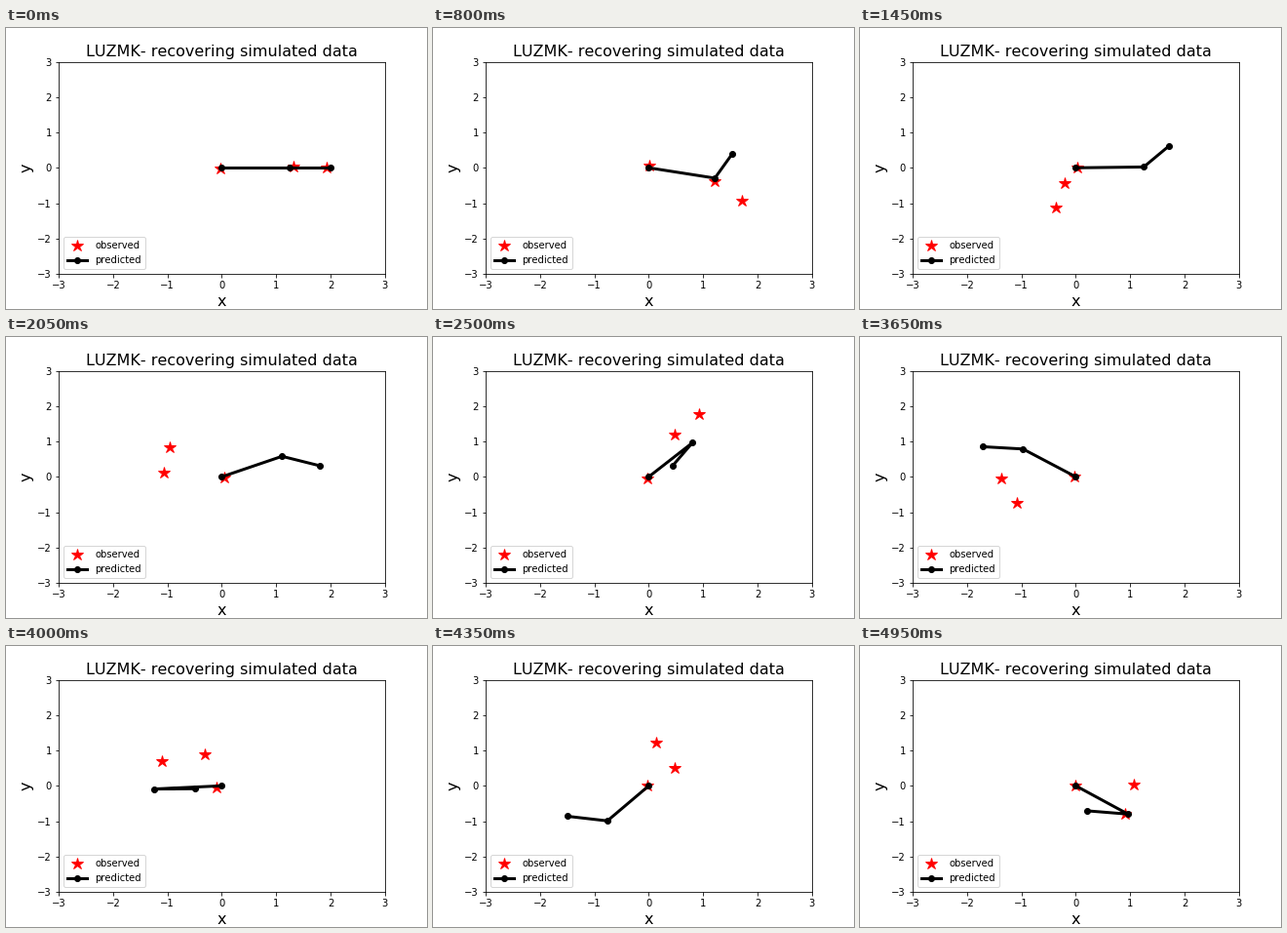
A matplotlib script that plays this animation: 432 px wide and 288 px high, repeating every 5 s.

```python
import numpy as np
import matplotlib.pyplot as plt
from matplotlib.animation import FuncAnimation

FRAMES, INTERVAL = 100, 50
UPPER, LOWER = 1.25, 0.75  # link lengths
KEY_TIMES = np.array([0, 16, 41, 59, 73, 87, 99])

plt.rcParams.update({
    "font.family": "DejaVu Sans",
    "text.kerning_factor": 6,  # whole-pixel letter spacing
})


def smooth(keys):
    """Cubic Hermite curve through key angles in degrees, one per frame."""
    t, v = KEY_TIMES, np.array(keys, float)
    slope = np.gradient(v, t, edge_order=2)
    n = np.arange(FRAMES)
    i = np.clip(np.searchsorted(t, n, side="right") - 1, 0, len(t) - 2)
    h = t[i + 1] - t[i]
    s = (n - t[i]) / h
    deg = ((1 + 2 * s) * (1 - s) ** 2 * v[i]
           + s * (1 - s) ** 2 * h * slope[i]
           + s ** 2 * (3 - 2 * s) * v[i + 1]
           + s ** 2 * (s - 1) * h * slope[i + 1])
    return np.radians(deg)


def link(length, angle):
    return length * np.stack([np.cos(angle), np.sin(angle)], axis=1)


def arm(upper, lower):
    """Base, elbow and tip of a two-link arm, indexed (frame, joint, xy)."""
    elbow = link(UPPER, smooth(upper))
    tip = elbow + link(LOWER, smooth(lower))
    return np.stack([np.zeros_like(elbow), elbow, tip], axis=1)


# The upper link winds up one way while the lower link spins the other way.
predicted = arm(upper=[0, -13.5, 27.6, 79, 141, 232.5, 320.2],
                lower=[0, 65, -21, -255, -545, -910, -1267])
observed = arm(upper=[0, -18, -221, -370, -506, -637, -760],
               lower=[0, -46, 258, 646, 1194, 1731, 2239])
observed += np.random.default_rng(4).normal(0, 0.045, observed.shape)

fig, ax = plt.subplots(figsize=(6, 4), dpi=72, facecolor="white")
fig.subplots_adjust(left=0.125, right=0.9, bottom=0.125, top=0.88)
ax.set(xlim=(-3, 3), ylim=(-3, 3))
ax.set_title("LUZMK- recovering simulated data", fontsize=16)
ax.set_xlabel("x", fontsize=16)
ax.set_ylabel("y", fontsize=16)

stars, = ax.plot([], [], "r*", markersize=12, label="observed")
links, = ax.plot([], [], "ko-", linewidth=3, label="predicted")
ax.legend(loc="lower left")


def draw(n):
    stars.set_data(*observed[n].T)
    links.set_data(*predicted[n].T)
    return stars, links


anim = FuncAnimation(fig, draw, frames=FRAMES, interval=INTERVAL,
                     init_func=lambda: draw(0), repeat=True, repeat_delay=0)
plt.show()
```
